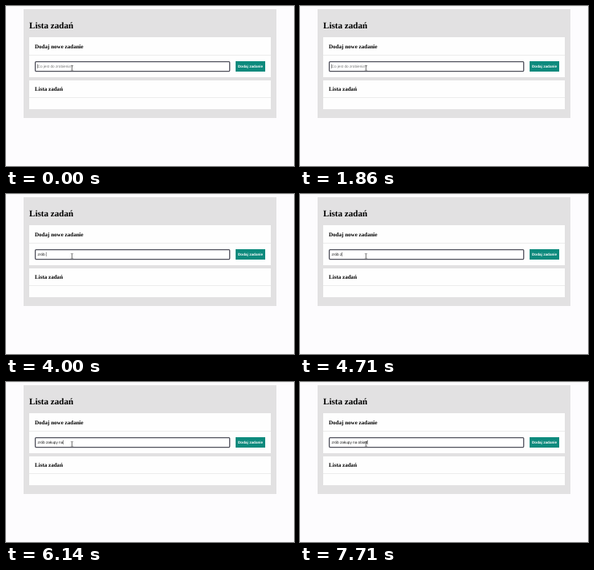
Write an HTML page that moves like this. It is 360 px wide and 200 px high and loops after 8000 ms.

```html
<!DOCTYPE html>
<html lang="pl">
<head>
<meta charset="utf-8">
<title>Lista zadań</title>
<style>
  html, body { margin: 0; width: 100%; height: 100%; overflow: hidden; background: #fdfcfe; }
  svg { display: block; width: 360px; height: 200px; }
  text { white-space: pre; text-rendering: geometricPrecision; fill: #000; }
  .heading { font: bold 7.05px "Liberation Serif", serif; }
  .title { font-size: 11.1px; }
  .field { font: 4.7px "Liberation Sans", sans-serif; }
  .button { font: bold 4.65px "Liberation Sans", sans-serif; fill: #fff; }
  .card { fill: #fefefe; }
  .rule { fill: #ececec; }
</style>
</head>
<body>
<svg viewBox="0 0 360 200">
  <rect width="360" height="1" fill="#f4f4f4"/>
  <rect x="22" y="4" width="316" height="136" fill="#e2e1e2"/>
  <text class="heading title" x="29" y="28.4">Lista zadań</text>

  <rect class="card" x="29" y="39" width="302" height="50"/>
  <rect class="rule" x="29" y="61" width="302" height="1"/>
  <text class="heading" x="36" y="52.7">Dodaj nowe zadanie</text>
  <rect x="36.6" y="69.6" width="243" height="12" rx="1" fill="#fff" stroke="#50515c" stroke-width="1.3"/>
  <text class="field" id="entry" x="39.5" y="77" xml:space="preserve"></text>
  <rect id="caret" y="72.6" width="0.5" height="5.4" fill="#333"/>
  <rect x="287" y="69" width="37" height="13" fill="#0d8a7d"/>
  <text class="button" x="290" y="77">Dodaj zadanie</text>

  <rect class="card" x="29" y="93" width="302" height="36"/>
  <rect class="rule" x="29" y="114" width="302" height="1"/>
  <text class="heading" x="36" y="105.7">Lista zadań</text>

  <path d="M81.3 74.6h.8l.4.4.4-.4h.8M82.5 75v5M81.3 80.4h.8l.4-.4.4.4h.8" fill="none" stroke="#222" stroke-width="0.6"/>
</svg>
<script>
const LOOP = 8000, START_X = 39.5;
const BLINK = 1000, CARET_ON = 570;
const TASK = "zrób zakupy na obiad";
const PLACEHOLDER = "Co jest do zrobienia?";
// Typing rhythm: [characters, time]; keys in between are evenly spaced.
const rhythm = [[0, -280], [1, 2430], [2, 3140], [5, 4000], [6, 4570], [9, 5000],
                [10, 5290], [11, 5710], [14, 6140], [16, 6860], [20, 7710]];
const entry = document.getElementById("entry");
const caret = document.getElementById("caret");
const start = performance.now();

function keyTime(count) {
  const i = Math.max(1, rhythm.findIndex(([typed]) => typed >= count));
  const [n0, t0] = rhythm[i - 1], [n1, t1] = rhythm[i];
  return t0 + (t1 - t0) * (count - n0) / (n1 - n0);
}

function draw(now) {
  const time = Math.max(0, now - start) % LOOP;
  let count = 0;
  while (count < TASK.length && keyTime(count + 1) <= time) count++;

  entry.textContent = count ? TASK.slice(0, count) : PLACEHOLDER;
  entry.style.fill = count ? "#111" : "#757575";
  caret.setAttribute("x", START_X + (count ? entry.getComputedTextLength() : -0.3));
  // Each key press restarts the blink.
  caret.style.opacity = (time - keyTime(count)) % BLINK < CARET_ON ? 1 : 0;
  requestAnimationFrame(draw);
}
draw(start);
</script>
</body>
</html>
```
